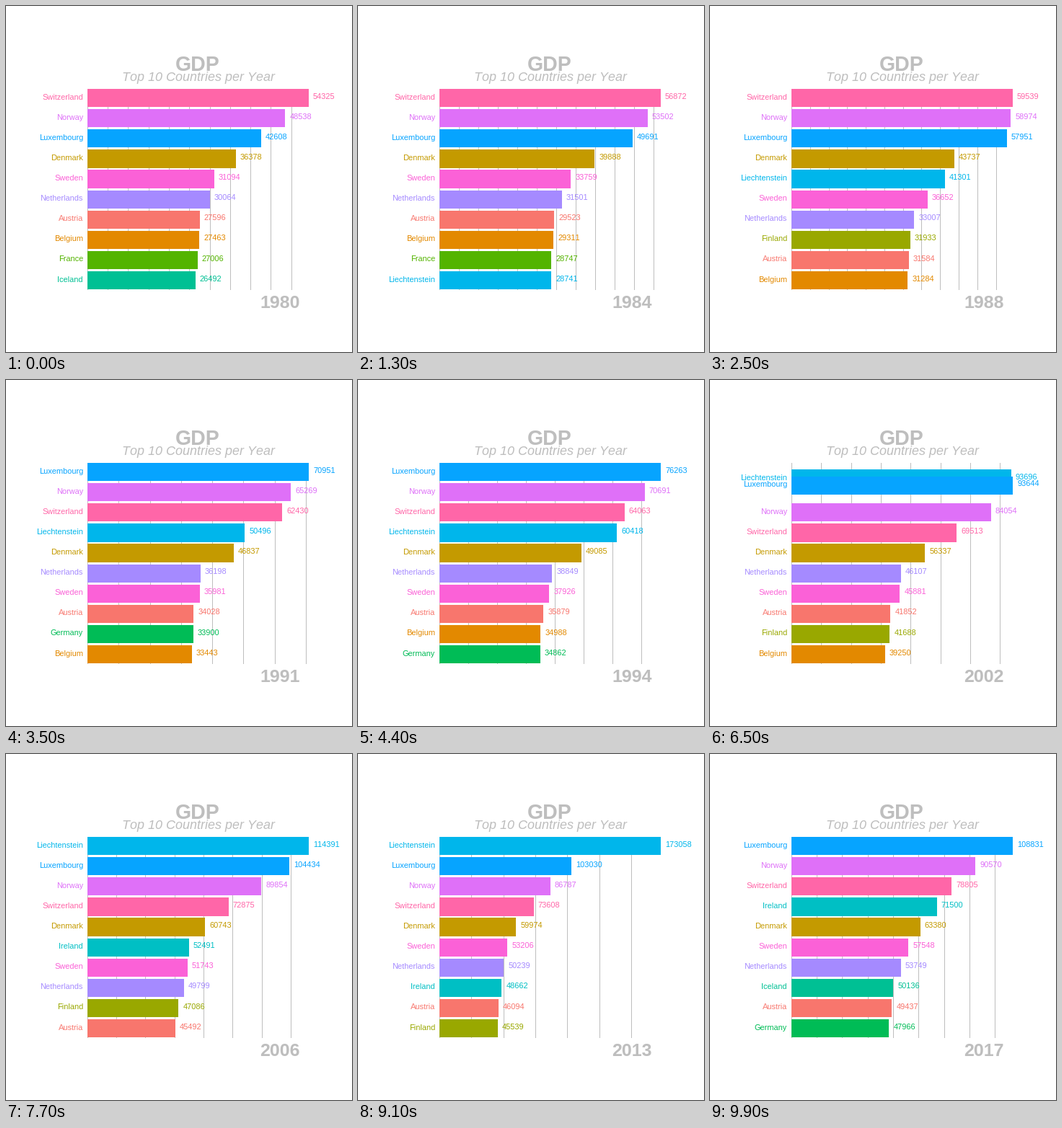
Write a matplotlib script that moves like this. It is 480 px wide and 480 px high and loops after 10000 ms.

```python
import math
import numpy as np
import matplotlib.pyplot as plt
from matplotlib.animation import FuncAnimation
from matplotlib.patches import Rectangle

SIZE, DPI = 480, 72            # at 72 dpi one point is one pixel
LEFT, RIGHT, TOP, BOTTOM = 112.95, 420, 115, 393
ROW0, PITCH, HALF = 127.62, 28.11, 12.65
FIRST, LAST = 1980, 2017
YEARS = np.arange(FIRST, LAST + 1)
GREY = "#BEBEBE"

plt.rcParams.update({
    "font.family": "Liberation Sans",
    "text.hinting": "native",
    "text.hinting_factor": 8,
    "text.kerning_factor": 6,
})

# Growth that all countries share
CYCLE = {1980: 1, 1988: 1.152, 1991: 1.24, 1998: 1.4,
         2006: 1.65, 2009: 1.6, 2013: 1.67, 2017: 1.79}
# Each country at four key years, with a few turns of its own below
KEY_YEARS = 1980, 1988, 2006, 2017
GDP = {
    "Austria": (27596, 31584, 45492, 49437),
    "Belgium": (27463, 31284, 43000, 46000),
    "Denmark": (36378, 43737, 60743, 63380),
    "Finland": (25400, 31933, 47086, 47560),
    "France": (27006, 30600, 40000, 43000),
    "Germany": (25700, 29800, 40000, 47966),
    "Iceland": (26492, 30900, 42000, 50136),
    "Ireland": (14000, 17200, 52491, 71500),
    "Liechtenstein": (20000, 41301, 114391, 180000),
    "Luxembourg": (42608, 57951, 104434, 108831),
    "Netherlands": (30064, 33007, 49799, 53749),
    "Norway": (48538, 58974, 89854, 90570),
    "Sweden": (31094, 36652, 51743, 57548),
    "Switzerland": (54325, 59539, 72875, 78805),
}
TURNS = {
    "Finland": {1991: 30500},
    "Germany": {1991: 33900},
    "Ireland": {2013: 48662},
    "Liechtenstein": {1998: 76745, 2013: 173058},
    "Luxembourg": {1991: 70951},
    "Netherlands": {1998: 42688},
    "Norway": {1998: 78629},
    "Sweden": {1991: 35981, 1998: 40683},
}


def log_curve(points, years):
    xs = sorted(points)
    return np.interp(years, xs, [math.log(points[x]) for x in xs])


def yearly(name):
    """Shared growth times the country's own slowly drifting level."""
    points = dict(zip(KEY_YEARS, GDP[name])) | TURNS.get(name, {})
    level = {y: v / math.exp(log_curve(CYCLE, y)) for y, v in points.items()}
    return np.exp(log_curve(level, YEARS) + log_curve(CYCLE, YEARS))


def hue_color(k, n):
    """Colour k of n evenly spaced hues at luminance 65 and chroma 100."""
    lum, chroma = 65, 100
    h = math.radians(15 + 360 * k / n)
    y = ((lum + 16) / 116) ** 3
    u = chroma * math.cos(h) / (13 * lum) + 0.19784
    v = chroma * math.sin(h) / (13 * lum) + 0.46834
    x = 9 * y * u / (4 * v)
    z = -x / 3 - 5 * y + 3 * y / v
    rgb = np.array([3.2405 * x - 1.5372 * y - 0.4985 * z,
                    -0.9693 * x + 1.8760 * y + 0.0416 * z,
                    0.0556 * x - 0.2040 * y + 1.0573 * z])
    return tuple(np.clip(1.055 * np.clip(rgb, 0, 1) ** (1 / 2.4) - 0.055, 0, 1))


SERIES = {name: yearly(name) for name in GDP}
COLORS = {name: hue_color(k, len(GDP)) for k, name in enumerate(GDP)}


def top_ten(i):
    """Map each leading country to its (rank, value) in year number i."""
    names = [n for n in GDP
             if not (n == "Liechtenstein" and FIRST + i == LAST)]
    names.sort(key=lambda n: -SERIES[n][i])
    return {n: (r, SERIES[n][i]) for r, n in enumerate(names[:10])}


STATES = [top_ten(i) for i in range(len(YEARS))]

# The pace slows and quickens, and the picture rests for one tick now and then
FRAMES = 100
HOLDS = 10, 28, 49, 55, 58, 67, 73
ARRIVE = np.ceil(np.interp(range(len(YEARS)),
                           [0, 8, 9, 11, 16, 19, 26, 37],
                           [0, 24, 26, 33, 46, 53, 70, 92]))


def phase_at(frame):
    step = frame - sum(h <= frame for h in HOLDS)
    return float(np.interp(step, ARRIVE, range(len(YEARS))))


def tick_step(top):
    """Choose a round step giving about five labels on 0..top."""
    best, choice = -np.inf, None
    for i, q in enumerate([1, 5, 2, 2.5, 4, 3]):
        for power in (3, 4, 5):
            step = q * 10 ** power
            low = int(top // step)
            for n in (low, low + 1):
                if n < 1:
                    continue
                end = n * step
                cover = 1 - 0.5 * ((top - end) / (0.1 * top)) ** 2
                ratio = max(end, top) / (4 * step)
                dense = 2 - max(ratio, 1 / ratio)
                score = 0.25 * (1 - i / 5) + 0.2 * cover + 0.5 * dense
                if score > best:
                    best, choice = score, step
    return choice


fig = plt.figure(figsize=(SIZE / DPI, SIZE / DPI), dpi=DPI, facecolor="white")
ax = fig.add_axes([0, 0, 1, 1])
ax.set_xlim(0, SIZE)
ax.set_ylim(SIZE, 0)
ax.axis("off")

ax.text(266, 90, "GDP", size=28.5, weight="bold", color=GREY, ha="center")
ax.text(266.5, 104, "Top 10 Countries per Year", size=18, style="italic",
        color=GREY, ha="center")
year_text = ax.text(380, 419, "", size=25, weight="bold", color=GREY, ha="center")
moving = []


def box(x0, y0, x1, y1, color, z):
    x0, y0, x1, y1 = (int(v + 0.5) for v in (x0, y0, x1, y1))
    moving.append(ax.add_patch(Rectangle(
        (x0, y0), x1 - x0, y1 - y0, fc=color, lw=0, antialiased=False, zorder=z)))


def label(x, y, s, color, ha):
    moving.append(ax.text(x, y, s, size=11, color=color, ha=ha, zorder=4))


def draw(frame):
    while moving:
        moving.pop().remove()
    phase = phase_at(frame)
    i = int(phase)
    t = phase - i
    now = STATES[i]
    after = STATES[i + 1] if t else now
    near = i + (t >= 0.5)
    year_text.set_text(str(FIRST + near))

    bars = {}
    for name in GDP:
        if name in now:
            (r0, v0), (r1, v1) = now[name], after.get(name, now[name])
            shown = SERIES[name][near] if name in after else v0
            bars[name] = r0 + (r1 - r0) * t, v0 + (v1 - v0) * t, shown

    top = max(value for _, value, _ in bars.values())
    scale = (RIGHT - LEFT) / top
    for v in np.arange(0, top, tick_step(top) / 2):
        x = int(LEFT + v * scale + 0.5)
        box(x, TOP, x + 1, BOTTOM + 1, GREY, 1)

    for name, (rank, value, shown) in bars.items():
        y = ROW0 + PITCH * rank
        end = LEFT + value * scale
        color = COLORS[name]
        box(LEFT, y - HALF, end, y + HALF, color, 2)
        label(LEFT - 6, y + 2, name, color, "right")
        label(end + 6, y + 1, f"{shown:.0f}", color, "left")
    return moving


anim = FuncAnimation(fig, draw, frames=FRAMES, interval=100,
                     init_func=lambda: draw(0), repeat=True, repeat_delay=0)
plt.show()
```
